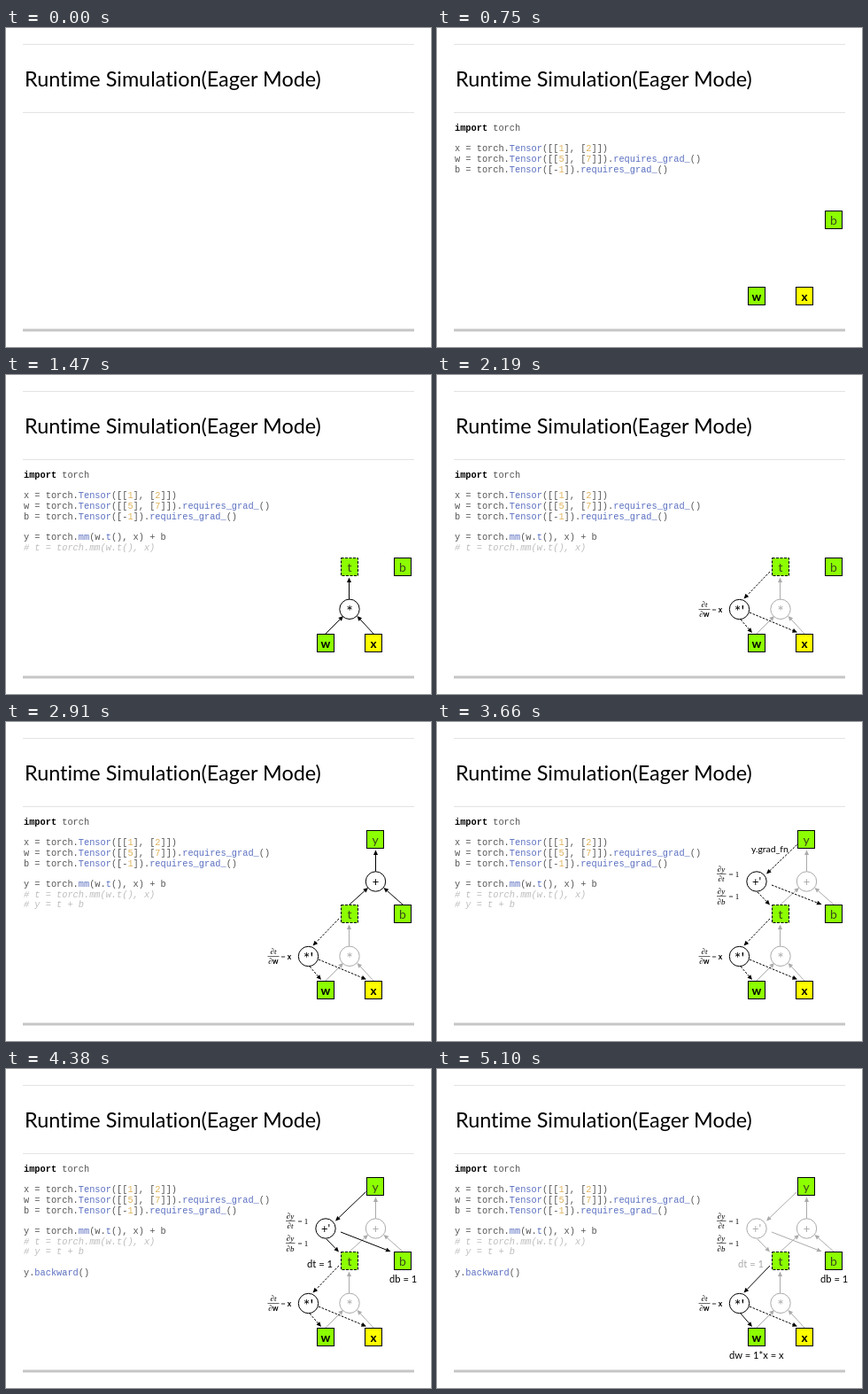
These frames come from a looping animation (480 by 360 pixels, 5850 ms). An HTML page:

```html
<!DOCTYPE html>
<html lang="en">
<head>
<meta charset="utf-8">
<title>Runtime Simulation</title>
<style>
html, body { margin: 0; height: 100%; overflow: hidden; background: #fff; }
svg { display: block; width: 100vw; height: 100vh; }
text {
  font-family: Lato, sans-serif;
  font-variant-ligatures: none;
  fill: currentColor;
  white-space: pre;
}
.title { font-size: 23.4px; }
.code text { font: 10.3px "Liberation Mono", monospace; fill: #555; }
.code .key { font-weight: 700; fill: #000; }
.code .fn { fill: #5a6fc0; }
.code .num { fill: #dfb35c; }
.code .note { font-style: italic; fill: #bdbdbd; }
.box rect { fill: #8cff00; stroke: #000; }
.box .input { fill: #ff0; }
.box .temp { stroke-dasharray: 3 1.5; }
.box text { font-size: 14px; fill: #3a4a1c; text-anchor: middle; }
.box .bold { font-size: 13.5px; font-weight: 700; fill: #000; }
.op circle { fill: #fff; stroke: currentColor; }
.op text { font-size: 13px; text-anchor: middle; }
.mul text, .mulBack text { font-size: 18px; }
.op line { stroke: currentColor; }
.op polygon { fill: currentColor; }
.dash { stroke-dasharray: 2.5 1.5; }
.label { font-size: 11.2px; }
.label.gradFn { font-size: 10.4px; }
.math text { font: 9px "Liberation Serif", serif; }
.math .frac { font-style: italic; text-anchor: middle; }
.math .vec { font: 700 8.5px Lato, sans-serif; }
.math line { stroke: #000; stroke-width: .6; }

.anim, .anim .dash { animation: 5850ms step-end infinite; }
.s1 { animation-name: s1; }
.s2 { animation-name: s2; }
.s3 { animation-name: s3; }
.s4 { animation-name: s4; }
.s5 { animation-name: s5; }
.s6 { animation-name: s6; }
.s7 { animation-name: s7; }
.mul { animation-name: mul; }
.add { animation-name: add; }
.addBack { animation-name: addBack; }
.gradFn { animation-name: gradFn; }
.dt { animation-name: dt; }
.addBack .dash { animation-name: addSolid; }
.mulBack .dash { animation-name: mulSolid; }
.mulBack .dash.stay { animation: none; }

@keyframes s1 { 0% { opacity: 0 } 12.8205%, to { opacity: 1 } }
@keyframes s2 { 0% { opacity: 0 } 25.1282%, to { opacity: 1 } }
@keyframes s3 { 0% { opacity: 0 } 37.4359%, to { opacity: 1 } }
@keyframes s4 { 0% { opacity: 0 } 49.7436%, to { opacity: 1 } }
@keyframes s5 { 0% { opacity: 0 } 62.5641%, to { opacity: 1 } }
@keyframes s6 { 0% { opacity: 0 } 74.8718%, to { opacity: 1 } }
@keyframes s7 { 0% { opacity: 0 } 87.1795%, to { opacity: 1 } }
@keyframes mul {
  0% { opacity: 0; color: #000 }
  25.1282% { opacity: 1; color: #000 }
  37.4359%, to { opacity: 1; color: #aaa }
}
@keyframes add {
  0% { opacity: 0; color: #000 }
  49.7436% { opacity: 1; color: #000 }
  62.5641%, to { opacity: 1; color: #aaa }
}
@keyframes addBack {
  0% { opacity: 0; color: #000 }
  62.5641% { opacity: 1; color: #000 }
  87.1795%, to { opacity: 1; color: #aaa }
}
@keyframes dt {
  0% { opacity: 0; color: #000 }
  74.8718% { opacity: 1; color: #000 }
  87.1795%, to { opacity: 1; color: #aaa }
}
@keyframes gradFn {
  0% { opacity: 0 }
  62.5641% { opacity: 1 }
  74.8718%, to { opacity: 0 }
}
@keyframes addSolid {
  0% { stroke-dasharray: 2.5 1.5 }
  74.8718%, to { stroke-dasharray: none }
}
@keyframes mulSolid {
  0% { stroke-dasharray: 2.5 1.5 }
  87.1795%, to { stroke-dasharray: none }
}
</style>
</head>
<body>
<svg viewBox="0 0 480 360" color="#000">
  <path d="M19 18.5H461M19 95.5H461" stroke="#e3e3e3"/>
  <path d="M19 341H461" stroke="#c6c6c6" stroke-width="3"/>
  <text class="title" x="21" y="66.2">Runtime Simulation(Eager Mode)</text>

  <g class="code">
    <g class="anim s1">
      <text x="20" y="116.3"><tspan class="key">import</tspan> torch</text>
      <text x="20" y="139.3">x = torch.<tspan class="fn">Tensor</tspan>([[<tspan class="num">1</tspan>], [<tspan class="num">2</tspan>]])</text>
      <text x="20" y="151">w = torch.<tspan class="fn">Tensor</tspan>([[<tspan class="num">5</tspan>], [<tspan class="num">7</tspan>]]).<tspan class="fn">requires_grad_</tspan>()</text>
      <text x="20" y="162.6">b = torch.<tspan class="fn">Tensor</tspan>([-<tspan class="num">1</tspan>]).<tspan class="fn">requires_grad_</tspan>()</text>
    </g>
    <g class="anim s2">
      <text x="20" y="186.2">y = torch.<tspan class="fn">mm</tspan>(w.<tspan class="fn">t</tspan>(), x) + b</text>
      <text x="20" y="198"><tspan class="note"># t = torch.mm(w.t(), x)</tspan></text>
    </g>
    <text class="anim s4" x="20" y="209.4"><tspan class="note"># y = t + b</tspan></text>
    <text class="anim s6" x="20" y="233">y.<tspan class="fn">backward</tspan>()</text>
  </g>

  <g id="graph"></g>

  <g class="math">
    <g class="anim s3">
      <text class="frac" x="302" y="261.5">∂t</text>
      <line x1="295.5" y1="264.5" x2="308.5" y2="264.5"/>
      <text class="frac" x="302" y="273">∂<tspan class="vec">w</tspan></text>
      <text x="310.5" y="267.5">= <tspan class="vec">x</tspan></text>
    </g>
    <g class="anim s5">
      <text class="frac" x="321" y="168.5">∂y</text>
      <line x1="316" y1="171.5" x2="326.5" y2="171.5"/>
      <text class="frac" x="321" y="180">∂t</text>
      <text x="329.5" y="174.5">= 1</text>
      <text class="frac" x="321" y="193.5">∂y</text>
      <line x1="316" y1="196.5" x2="326.5" y2="196.5"/>
      <text class="frac" x="321" y="205.5">∂b</text>
      <text x="329.5" y="199.5">= 1</text>
    </g>
  </g>

  <text class="label anim gradFn" x="355" y="147">y.grad_fn</text>
  <text class="label anim dt" x="340" y="224">dt = 1</text>
  <text class="label anim s6" x="433" y="241">db = 1</text>
  <text class="label anim s7" x="330" y="327">dw = 1*x = x</text>
</svg>
<script>
const graph = document.getElementById('graph');

const box = (step, name, x, y, rect = '', text = '') =>
  `<g class="box anim ${step}">
    <rect class="${rect}" x="${x - 9.5}" y="${y - 10}" width="19" height="20"/>
    <text class="${text}" x="${x}" y="${y + 5.5}">${name}</text>
  </g>`;

function arrow(x1, y1, x2, y2, style = '') {
  const len = Math.hypot(x2 - x1, y2 - y1);
  const ux = (x2 - x1) / len, uy = (y2 - y1) / len;
  const bx = x2 - ux * 5.5, by = y2 - uy * 5.5;
  const side = s => `${bx - uy * s},${by + ux * s}`;
  return `<line class="${style}" x1="${x1}" y1="${y1}" x2="${bx}" y2="${by}"/>
    <polygon points="${x2},${y2} ${side(2.5)} ${side(-2.5)}"/>`;
}

const op = (anim, sign, x, y, drop, arrows) =>
  `<g class="op anim ${anim}">
    ${arrows.map(a => arrow(...a)).join('')}
    <circle cx="${x}" cy="${y}" r="11.2"/>
    <text x="${x}" y="${y + drop}">${sign}</text>
  </g>`;

graph.innerHTML = [
  op('mul', '*', 388, 264.3, 8.7, [
    [361, 292, 381, 272], [415, 292, 396.5, 272], [387.5, 253, 387.5, 228.5]
  ]),
  op('s3 mulBack', "*'", 341.5, 264.5, 8.7, [
    [376, 222, 346.5, 252.5, 'dash'],
    [343, 276, 356, 291, 'dash'],
    [353, 268, 407, 290.5, 'dash stay']
  ]),
  op('add', '+', 417.5, 180, 4.7, [
    [388, 206, 409, 187], [448, 206, 426.5, 187], [417.5, 169, 417.5, 144.5]
  ]),
  op('addBack', "+'", 361, 180, 4.7, [
    [406.5, 138.5, 372, 171.5, 'dash'],
    [362, 192, 376, 206.5, 'dash'],
    [378, 184, 434.5, 206, 'dash']
  ]),
  box('s1', 'b', 448, 216.5),
  box('s1', 'w', 361, 302.5, '', 'bold'),
  box('s1', 'x', 415, 302.5, 'input', 'bold'),
  box('s2', 't', 388, 216.5, 'temp'),
  box('s4', 'y', 417, 132.5)
].join('');
</script>
</body>
</html>
```
